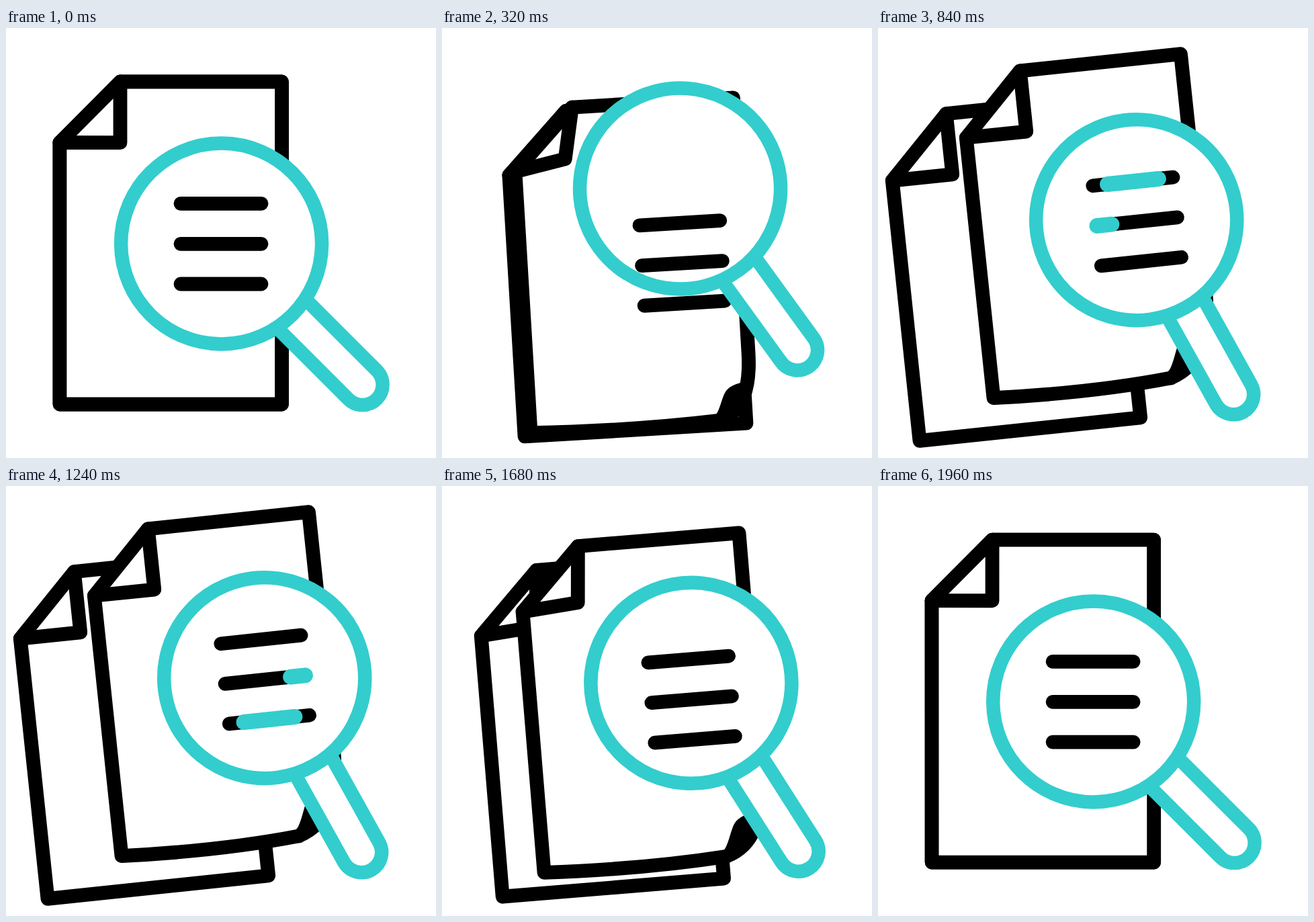
An HTML page for the animation above (2000 ms loop, 640 px wide and 640 px high).

```html
<!DOCTYPE html>
<html lang="en">
<head>
<meta charset="utf-8">
<title>Document search</title>
<style>
  html, body { margin: 0; width: 100%; height: 100%; overflow: hidden; background: #fff; }
  svg { display: block; width: 100%; height: 100%; }
  .ink, .mark, .glass { fill: none; stroke-linejoin: round; stroke-linecap: round; }
  .ink { stroke: #000; stroke-width: 20.8; }
  .mark { stroke: #33cdcd; stroke-width: 23; }
  .glass { stroke: #33cdcd; stroke-width: 20.5; stroke-linecap: butt; }
  .paper { fill: #fff; }
</style>
</head>
<body>
<svg viewBox="0 0 640 640">
  <g id="back"><path class="ink paper"/><path class="ink"/></g>
  <g id="front"><path class="ink paper"/><path class="ink"/><path class="ink" id="flap"/></g>
  <g class="lens paper"><circle r="149.5"/><path d="M140 -30H297A30 30 0 0 1 297 30H140Z"/></g>
  <g id="lines"></g>
  <g class="lens glass"><circle r="149.5"/><path d="M146 -30H297A30 30 0 0 1 297 30H146"/></g>
</svg>
<script>
const LOOP = 2000, STEP = 40;
const $ = id => document.getElementById(id);

// Eased progress from 0 to 1 between two times
function ease(t, from, to) {
  const u = Math.min(1, Math.max(0, (t - from) / (to - from)));
  return u * u * (3 - 2 * u);
}

const lines = [261.3, 321.3, 381].map((y, i) => {
  const add = cls => {
    const path = document.createElementNS('http://www.w3.org/2000/svg', 'path');
    path.setAttribute('class', cls);
    $('lines').append(path);
    return path;
  };
  add('ink').setAttribute('d', `M260 ${y}H380`);
  return { y, delay: i * 200, mark: add('mark') };
});

function pagePath(curl) {
  const k = (x, y) => `${410.5 + (x - 410) * curl} ${560 + (y - 560) * curl} `;
  return {
    outline: `M170 80H410.5L${k(410, 430)}C${k(410, 500)}${k(393, 543)}${k(345, 558)}` +
      `Q230 ${560 + 8 * curl} 80 560V170.5Z`,
    flap: `M${k(345, 558)}C${k(358, 553)}${k(363, 528)}${k(371, 513)}Q${k(376, 503)}${k(398, 500)}`
  };
}

function drawPage(group, outline, fold, place) {
  group.setAttribute('transform', place);
  group.children[0].setAttribute('d', outline);
  group.children[1].setAttribute('d', `M170 80L${170 - fold} ${170.7 - fold}L80 170.5`);
}

function draw(t) {
  const turn = ease(t, 80, 520) - ease(t, 1556, 1970);
  const drop = ease(t, 80, 290) - ease(t, 1770, 1965);
  const split = ease(t, 280, 507) - ease(t, 1570, 1810);
  const lift = ease(t, 80, 250) - ease(t, 270, 600);

  const fold = 16 * drop * (1 - split);
  const curl = 0.75 * drop + 0.25 * split;
  const x = 66 * turn, y = 38.5 * drop;
  const place = (dx, dy) => `translate(${dx} ${dy}) rotate(${-6 * turn} 245 320)`;
  const frontPlace = place(x, y - 63.8 * split);

  const shape = pagePath(curl);
  drawPage($('back'), pagePath(0).outline, fold, place(x - 110 * split, y));
  drawPage($('front'), shape.outline, fold, frontPlace);
  $('flap').setAttribute('d', shape.flap);
  $('flap').style.display = curl > 0.01 ? '' : 'none';

  $('lines').setAttribute('transform', frontPlace);
  for (const { y, delay, mark } of lines) {
    const head = ease(t, 520 + delay, 960 + delay);
    const tail = ease(t, 720 + delay, 1160 + delay);
    mark.style.display = head - tail > 0.001 ? '' : 'none';
    mark.setAttribute('d', `M${260 + 120 * tail} ${y}H${260 + 120 * head}`);
  }

  const lensX = 320.6 + 64.1 * turn + lift * (20 * turn - 14);
  const lensY = 321 - 35.3 * turn - 66 * lift;
  for (const lens of document.querySelectorAll('.lens'))
    lens.setAttribute('transform', `translate(${lensX} ${lensY}) rotate(${45 + 15.9 * turn})`);
}

function tick() {
  const t = performance.now() % LOOP;
  draw(Math.floor(t / STEP) * STEP);
  requestAnimationFrame(tick);
}
tick();
</script>
</body>
</html>
```
